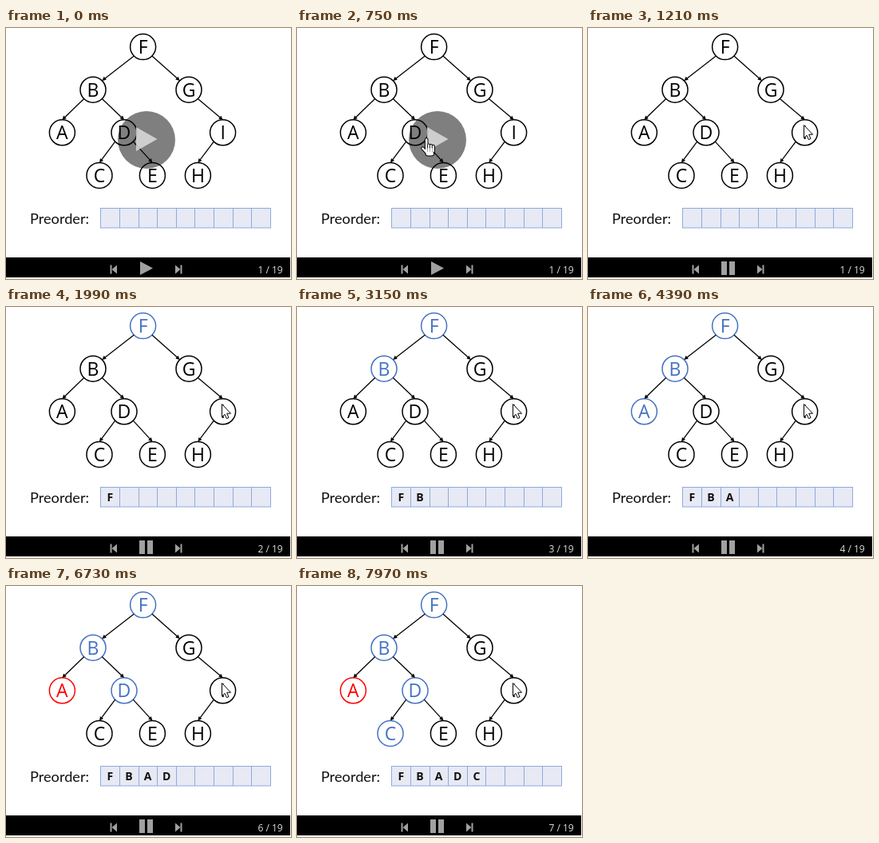
Recreate the animation shown at these times as an HTML page with a canvas. Size 357 px wide and 314 px high, loop 8 s.

```html
<!DOCTYPE html>
<html lang="en">
<head>
<meta charset="utf-8">
<title>Preorder traversal</title>
<style>
  html, body { margin: 0; width: 100%; height: 100%; overflow: hidden; background: #fff; }
  canvas { display: block; width: 357px; height: 314px; }
</style>
</head>
<body>
<canvas id="stage"></canvas>
<script>
const W = 357, H = 314, LOOP = 8000;
const BLUE = '#4472c4', RED = '#ff0000', INK = '#000', GRAY = '#a0a0a0';
const SANS = '"Open Sans", "Noto Sans", sans-serif';
const R = 16;
const PLAY_AT = 900;

const canvas = document.getElementById('stage');
const ctx = canvas.getContext('2d');
const dpr = window.devicePixelRatio || 1;
canvas.width = W * dpr;
canvas.height = H * dpr;

// The tree: horizontal place, depth and parent of each node.
const tree = {};
function add(name, x, parent) {
  const depth = parent ? tree[parent].depth + 1 : 0;
  tree[name] = { x, y: 23.6 + 53.6 * depth, depth, parent };
}
add('F', 171.6);
add('B', 109, 'F');
add('G', 229, 'F');
add('A', 70.4, 'B');
add('D', 148, 'B');
add('I', 271.6, 'G');
add('C', 117, 'D');
add('E', 183.4, 'D');
add('H', 240.4, 'I');

// Meeting a node a second time marks it as finished.
const visits = [[1990, 'F'], [3150, 'B'], [4390, 'A'], [5570, 'A'], [6730, 'D'], [7900, 'C']];

function rect(x, y, w, h, color) {
  ctx.fillStyle = color;
  ctx.fillRect(x, y, w, h);
}

function circle(x, y, r, fill, stroke) {
  ctx.beginPath();
  ctx.arc(x, y, r, 0, Math.PI * 2);
  ctx.fillStyle = fill;
  ctx.fill();
  if (!stroke) return;
  ctx.strokeStyle = stroke;
  ctx.lineWidth = 1.5;
  ctx.stroke();
}

// Triangle with its tip at x, y; a negative length points left.
function triangle(x, y, length, half, color) {
  ctx.beginPath();
  ctx.moveTo(x, y);
  ctx.lineTo(x - length, y - half);
  ctx.lineTo(x - length, y + half);
  ctx.fillStyle = color;
  ctx.fill();
}

function line(x1, y1, x2, y2, color, width = 1) {
  ctx.beginPath();
  ctx.moveTo(x1, y1);
  ctx.lineTo(x2, y2);
  ctx.strokeStyle = color;
  ctx.lineWidth = width;
  ctx.stroke();
}

function text(str, x, y, font, color, align = 'left') {
  ctx.font = font;
  ctx.fillStyle = color;
  ctx.textAlign = align;
  ctx.fillText(str, x, y);
}

// Leaves the parent diagonally and lands on the child's rim, at the top below depth 1.
function drawEdge(child) {
  const from = tree[child.parent];
  const side = Math.sign(child.x - from.x), diag = R * Math.SQRT1_2;
  const x1 = from.x + side * diag, y1 = from.y + diag;
  const x2 = child.x - (child.depth === 1 ? side * diag : 0);
  const y2 = child.y - (child.depth === 1 ? diag : R);
  ctx.save();
  ctx.translate(x2, y2);
  ctx.rotate(Math.atan2(y2 - y1, x2 - x1));
  line(-Math.hypot(x2 - x1, y2 - y1), 0, -2, 0, INK, 1.3);
  triangle(0, 0, 5, 2.5, INK);
  ctx.restore();
}

function drawTree(seen) {
  const colors = [INK, BLUE, RED];
  for (const name in tree) {
    const node = tree[name];
    const color = colors[seen.filter(n => n === name).length];
    circle(node.x, node.y, R, '#fff', color);
    text(name, node.x, node.y + 8.4, '23px ' + SANS, color, 'center');
  }
  Object.values(tree).filter(n => n.parent).forEach(drawEdge);
}

function drawTable(order) {
  const x = 118.5, y = 225.5, cell = 23.65, h = 24.5, border = '#8faadc';
  text('Preorder:', 30, 244.5, '18.2px Lato, ' + SANS, '#111');
  rect(x, y, cell * 9, h, '#e7eaf4');
  ctx.strokeStyle = border;
  ctx.lineWidth = 1;
  ctx.strokeRect(x, y, Math.round(cell * 9), h);
  for (let i = 1; i < 9; i++) {
    const cx = Math.floor(x + cell * i + 0.2) + 0.5;
    line(cx, y, cx, y + h, border);
  }
  order.forEach((name, i) =>
    text(name, x + cell * (i + 0.5), 243, 'bold 14px ' + SANS, '#111', 'center'));
}

function drawBar(playing, page) {
  const mid = 302;
  rect(0, 287, W - 1, 25, '#000');
  for (const dir of [-1, 1]) {
    const edge = 175.5 + dir * 44;
    rect(edge - 1, mid - 5.5, 2, 11, GRAY);
    triangle(edge - dir, mid, dir * 6.5, 5.5, GRAY);
  }
  if (playing) {
    rect(167, 292, 7, 17, GRAY);
    rect(177, 292, 7, 17, GRAY);
  } else {
    triangle(184, 300.5, 16, 8.5, GRAY);
  }
  text(page + ' / 19', 315.4, 307, '12px ' + SANS, '#dcdcdc');
}

function drawOverlay() {
  circle(176, 140, 36, 'rgba(0,0,0,.5)');
  triangle(189.5, 139, 26.5, 15, 'rgba(220,220,220,.85)');
}

function drawArrow() {
  const shape = new Path2D('M.5 .5V16.5L4 13.3L6.4 18.6L9 17.5L6.7 12.2H11.5Z');
  ctx.fillStyle = '#fff';
  ctx.fill(shape);
  ctx.strokeStyle = INK;
  ctx.lineWidth = 1;
  ctx.stroke(shape);
}

// Rounded strokes make the fingers: a black pass, then a slimmer white one.
function drawHand() {
  ctx.lineCap = 'round';
  for (const [color, grow] of [[INK, 2], ['#fff', 0]]) {
    line(2.5, 13.5, 7, 18.5, color, 2.4 + grow);
    for (let i = 0; i < 4; i++) {
      line(7.2 + 2.8 * i, i ? 9 + 0.7 * i : 2.6, 7.2 + 2.8 * i, 17, color, 2.6 + grow);
    }
    line(9, 20, 13.5, 20, color, 5 + grow);
  }
  for (let i = 0; i < 3; i++) line(8.6 + 2.8 * i, 9 + i / 2, 8.6 + 2.8 * i, 13, INK, 0.8);
}

function pointerAt(t) {
  const glide = (from, to, start, length) => {
    const p = Math.min(1, Math.floor((t - start) / 77) * 77 / length);
    return from.map((v, i) => v + (to[i] - v) * p);
  };
  if (t < 600) return glide([198, 272], [155, 139], 210, 154);
  if (t < 750) return [149, 127];
  if (t < PLAY_AT) return [155, 137];
  return glide([160, 140], [270, 121], PLAY_AT, 308);
}

function drawPointer(t) {
  if (t < 210) return;
  ctx.save();
  ctx.translate(...pointerAt(t));
  if (t >= 364 && t < PLAY_AT) drawHand();
  else drawArrow();
  ctx.restore();
}

function draw(t) {
  const seen = visits.filter(([at]) => t >= at).map(([, name]) => name);
  const playing = t >= PLAY_AT;
  ctx.setTransform(dpr, 0, 0, dpr, 0, 0);
  rect(0, 0, W, H, '#fff');
  drawTree(seen);
  drawTable([...new Set(seen)]);
  drawBar(playing, seen.length + 1);
  if (!playing) drawOverlay();
  drawPointer(t);
}

const begin = performance.now();
function frame() {
  draw((performance.now() - begin) % LOOP);
  requestAnimationFrame(frame);
}
frame();
</script>
</body>
</html>
```
